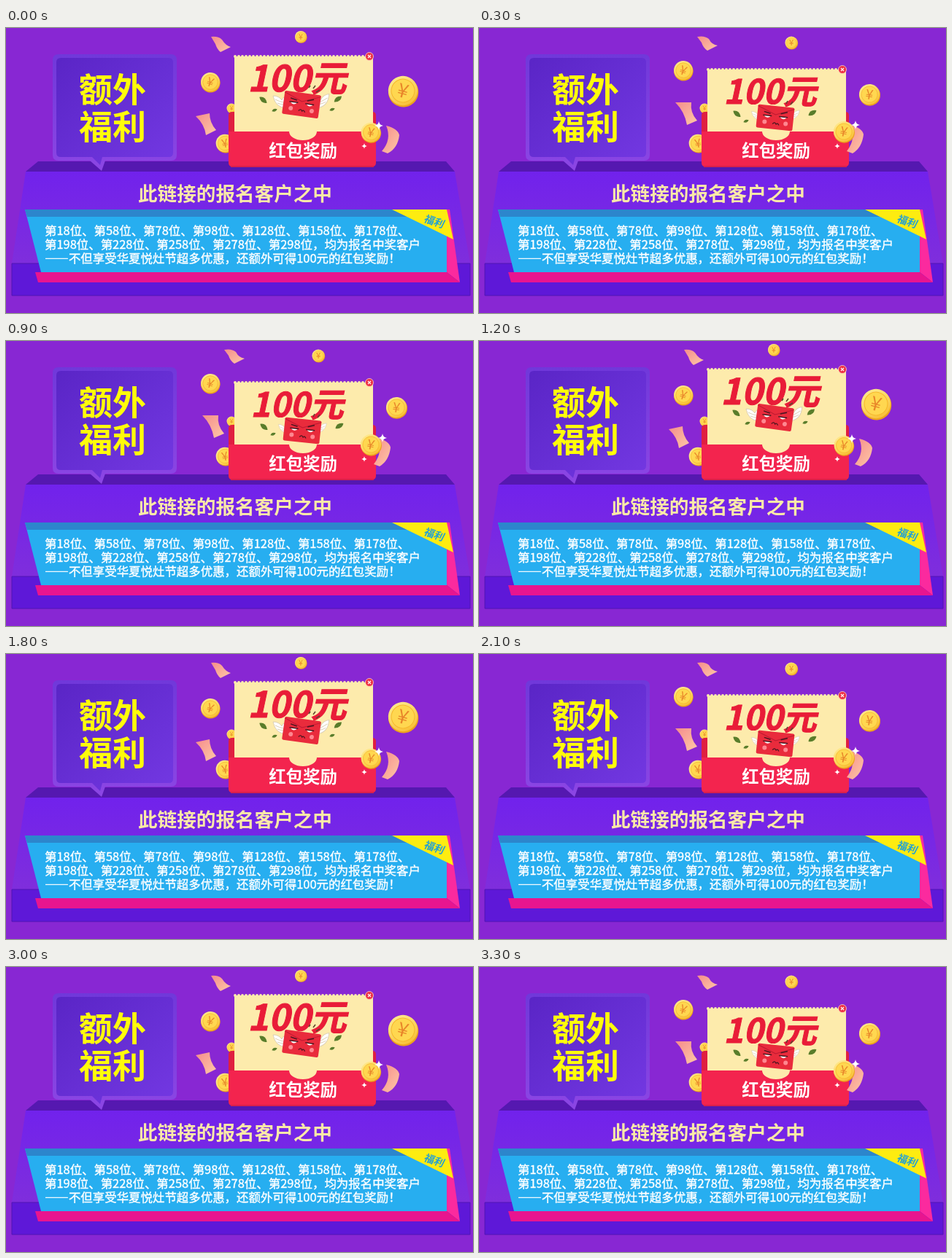
Write an HTML page that moves like this. It is 640 px wide and 391 px high and loops after 3600 ms.

```html
<!DOCTYPE html>
<html lang="zh-CN">
<head>
<meta charset="utf-8">
<title>额外福利</title>
<style>
  html, body { margin: 0; width: 100%; height: 100%; overflow: hidden; background: #8827d3; }
  svg { display: block; width: 100%; height: 100%; }
  text { font-family: "Noto Sans CJK SC", "Noto Sans CJK", sans-serif; }
  .bold { font-weight: 700; }
  .mid { text-anchor: middle; }
  .amount { font-weight: 900; font-size: 49px; fill: #e91c38; stroke: #e91c38; stroke-width: 1; }
  .coin { fill: #e8862a; font-size: 25px; }
</style>
</head>
<body>
<svg viewBox="0 0 640 391">
  <defs>
    <linearGradient id="bubble" x1="0" y1="0" x2="1" y2="1">
      <stop offset="0" stop-color="#5a25c6"/><stop offset="1" stop-color="#7338e2"/>
    </linearGradient>
    <linearGradient id="rim" x1="0" y1="0" x2="0" y2="1">
      <stop offset="0" stop-color="#7038da"/><stop offset="1" stop-color="#8c46e4"/>
    </linearGradient>
    <linearGradient id="front" x1="0" y1="0" x2="0" y2="1">
      <stop offset="0" stop-color="#7122ec"/><stop offset="1" stop-color="#7f2edc"/>
    </linearGradient>
    <linearGradient id="paper" x1="0" y1="0" x2="1" y2="1">
      <stop offset="0" stop-color="#f58c8c"/><stop offset="1" stop-color="#ffc8a6"/>
    </linearGradient>
    <linearGradient id="gold" x1="0" y1="0" x2="1" y2="1">
      <stop offset="0" stop-color="#fff09a"/><stop offset="1" stop-color="#f8b928"/>
    </linearGradient>

    <g id="coin">
      <circle cx="1" cy="1.5" r="19.5" fill="#eda21d"/>
      <circle r="19" fill="url(#gold)"/>
      <circle r="15" fill="#ffd750" stroke="#f6b92c"/>
      <text class="coin mid" y="9">¥</text>
    </g>
    <path id="spark" d="M0-6Q.7-.7 6 0Q.7.7 0 6Q-.7.7-6 0Q-.7-.7 0-6" fill="#fff"/>
    <path id="leaf" d="M-6 2Q-3-6 6-3Q3 5-6 2" fill="#597d2b"/>
    <g id="wing">
      <path d="M0 9Q-15 8-18-8Q-10-8-6-2Q-5-7 0-5Z" fill="#fff" stroke="#ddd0b5"/>
      <path d="M-15-3Q-9 0-4 1M-12 2Q-7 4-3 4" fill="none" stroke="#ddd0b5"/>
    </g>
    <g id="buddy">
      <rect x="-25" y="-16" width="50" height="32" rx="2" fill="#e92b3c"/>
      <path d="M-25-14L0-4L25-14" fill="none" stroke="#bd1931"/>
      <path d="M-16-2h10q-5 6-10 0M6-2h10q-5 6-10 0" fill="#fff"/>
      <g fill="none" stroke="#4b1720" stroke-width="1.5">
        <path d="M-17-2h12M5-2h12M-16-7l9 2M7-6l9-3"/>
        <path d="M-3 9q3-4 5 0q2-3 4 1" stroke-width="1.2"/>
      </g>
      <g fill="#ff8790"><circle cx="-14" cy="7" r="3"/><circle cx="15" cy="7" r="3"/></g>
    </g>
    <g id="ticket">
      <path d="M313 39H503V155H313Z" fill="#fdebac"/>
      <path d="M314 39H503" stroke="#fdebac" stroke-width="4" stroke-linecap="round" stroke-dasharray="0 5"/>
      <circle cx="498" cy="39" r="5.5" fill="#ee3045" stroke="#fff0d0" stroke-width=".7"/>
      <path d="M496 37l4 4m0-4l-4 4" stroke="#fff" stroke-width="1.2"/>
    </g>
  </defs>

  <rect width="640" height="391" fill="#8827d3"/>

  <!-- podium -->
  <path d="M44 183H603L615 197H27Z" fill="#5518b0"/>
  <path d="M27 197H615L636 323H8Z" fill="url(#front)"/>
  <path d="M8 323H636V367H8Z" fill="#5e18d8" stroke="#5014b4"/>

  <!-- notice panel -->
  <path d="M604 249H608L622 349L604 335Z" fill="#fb2a9e"/>
  <path d="M40 335H604L622 349H44Z" fill="#e8158f"/>
  <path d="M26 249H604V335H48Z" fill="#27aef0"/>
  <path d="M26 249H604V259H29Z" fill="#2c86cc"/>
  <path d="M529 249H604L613 290Z" fill="#fdec10"/>
  <text class="bold mid" font-size="14" fill="#22a0d4" transform="translate(585 270) rotate(19) skewX(-8)">福利</text>
  <text class="bold mid" x="314" y="237" font-size="26.6" fill="#fae9a8">此链接的报名客户之中</text>
  <g font-size="16.45" fill="#fff" stroke="#fff" stroke-width=".4">
    <text x="53" y="283.5">第18位、第58位、第78位、第98位、第128位、第158位、第178位、</text>
    <text x="53" y="302.5">第198位、第228位、第258位、第278位、第298位，均为报名中奖客户</text>
    <text x="53" y="321.5">——不但享受华夏悦灶节超多优惠，还额外可得100元的红包奖励！</text>
  </g>

  <!-- speech bubble -->
  <path d="M72 36H226Q234 36 234 44V174Q234 182 226 182H136L131 196L115 182H72Q64 182 64 174V44Q64 36 72 36Z" fill="url(#rim)"/>
  <path d="M75 41H223Q229 41 229 47V171Q229 177 223 177H132L129 188L118 177H75Q69 177 69 171V47Q69 41 75 41Z" fill="url(#bubble)"/>
  <g class="bold mid" font-size="46" fill="#fffc0a">
    <text x="146" y="101">额外</text>
    <text x="146" y="152">福利</text>
  </g>

  <!-- gift pocket, with a two-pose scene -->
  <use href="#coin" transform="translate(309 110) scale(.34)"/>
  <use href="#coin" transform="translate(300 158) rotate(-12) scale(.65)"/>
  <path d="M305 120Q305 115 310 115H502Q507 115 507 120V155H305Z" fill="#e01f40"/>

  <g class="pose">
    <use href="#ticket"/>
    <text class="amount mid" transform="translate(399 87) skewX(-12)">100元</text>
    <path d="M415 82l2-3m4 4l3-4m1 9l5-3" stroke="#60462e" stroke-width="1.6"/>
    <use href="#wing" transform="translate(384 101)"/>
    <use href="#wing" transform="translate(426 101) scale(-1 1) rotate(8)"/>
    <use href="#buddy" transform="translate(405 105) rotate(8)"/>
    <use href="#leaf" transform="translate(352 99) rotate(60)"/>
    <use href="#leaf" transform="translate(368 113) scale(.6)"/>
    <use href="#leaf" transform="translate(455 98) rotate(-15)"/>
    <use href="#leaf" transform="translate(447 112) scale(.6)"/>
  </g>
  <g class="pose">
    <use href="#ticket" y="18"/>
    <text class="amount mid" transform="translate(399 104) scale(.94) skewX(-12)">100元</text>
    <path d="M421 104l2-4m4 5l3-4" stroke="#60462e" stroke-width="1.6"/>
    <use href="#wing" transform="translate(386 120) scale(.7)"/>
    <use href="#wing" transform="translate(426 119) scale(-.75 .75)"/>
    <use href="#buddy" transform="translate(406 123) rotate(6)"/>
    <use href="#leaf" transform="translate(353 118) rotate(60)"/>
    <use href="#leaf" transform="translate(366 128) scale(.6)"/>
    <use href="#leaf" transform="translate(457 117) rotate(-10)"/>
  </g>

  <path d="M305 142H388A19 12 0 0 0 426 142H507V185Q507 190 502 190H310Q305 190 305 185Z" fill="#f3244e"/>
  <path d="M308 190H504" stroke="#d8204c" stroke-width="2"/>
  <text class="bold mid" x="407" y="177" font-size="23.4" fill="#fff">红包奖励</text>

  <g class="pose">
    <path d="M281 12Q291 11 296 16Q301 24 308 26L294 33Q289 29 287 22Z" fill="url(#paper)"/>
    <path d="M260 121L279 117Q279 130 288 140L274 147Q272 132 260 121Z" fill="url(#paper)"/>
    <path d="M521 134Q537 138 539 147Q537 165 523 172L515 169Q529 153 521 134Z" fill="url(#paper)"/>
    <use href="#coin" transform="translate(404 12) scale(.42)"/>
    <use href="#coin" transform="translate(280 74) rotate(20) scale(.68)"/>
    <use href="#coin" transform="translate(544 86) rotate(15) scale(1.06)"/>
    <use href="#coin" transform="translate(500 143) rotate(12) scale(.7)"/>
    <use href="#spark" transform="translate(511 134)"/>
    <use href="#spark" transform="translate(491 162) scale(.65)"/>
  </g>
  <g class="pose">
    <path d="M299 12Q309 10 315 15Q319 23 327 24L313 31Q307 27 305 20Z" fill="url(#paper)"/>
    <path d="M269 102L291 102Q289 116 299 127L285 133Q282 115 269 102Z" fill="url(#paper)"/>
    <path d="M509 133Q525 137 527 146Q525 164 512 172L504 169Q517 153 509 133Z" fill="url(#paper)"/>
    <use href="#coin" transform="translate(428 20) scale(.45)"/>
    <use href="#coin" transform="translate(280 58) rotate(20) scale(.68)"/>
    <use href="#coin" transform="translate(535 91) rotate(8) scale(.74)"/>
    <use href="#coin" transform="translate(500 142) rotate(12) scale(.74)"/>
    <use href="#spark" transform="translate(516 133)"/>
    <use href="#spark" transform="translate(491 162) scale(.65)"/>
  </g>
</svg>
<script>
  const POSE_MS = 300;
  const poses = document.querySelectorAll(".pose");
  const start = performance.now();

  function draw(now) {
    const active = Math.floor(Math.max(0, now - start) / POSE_MS) % 2;
    poses.forEach((pose, i) => pose.style.display = i % 2 === active ? "" : "none");
    requestAnimationFrame(draw);
  }
  draw(start);
</script>
</body>
</html>
```
